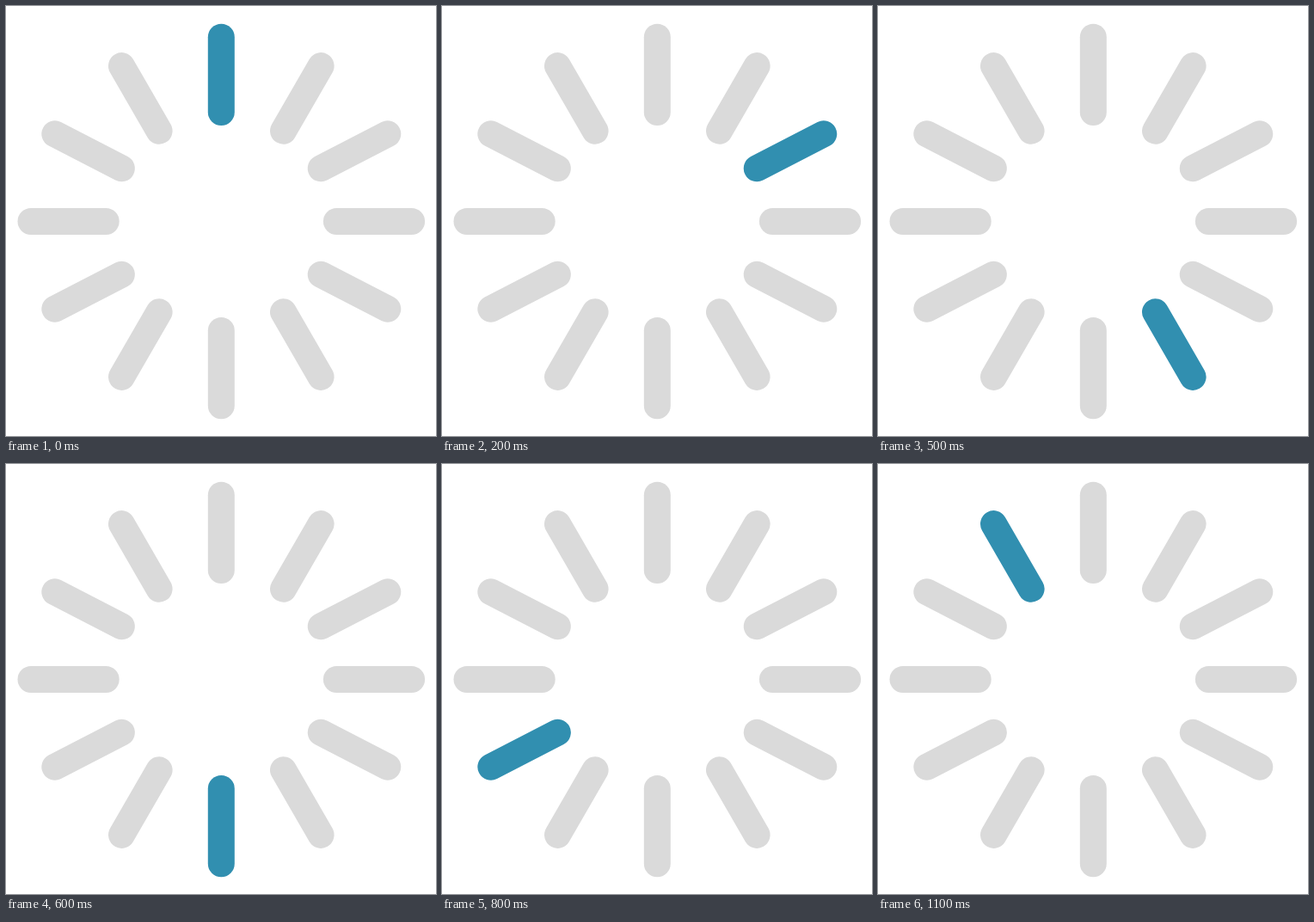
Recreate the animation shown at these times as an HTML page. Size 500x500 px, loop 1.2 s.

```html
<!DOCTYPE html>
<html lang="en">
<head>
<meta charset="utf-8">
<title>Spinner</title>
<style>
html, body { margin: 0; width: 100%; height: 100%; overflow: hidden; background: #fff; }
svg { display: block; width: 100%; height: 100%; }
line { stroke: #dadada; stroke-width: 31; stroke-linecap: round; }
line.on { stroke: #318fb0; }
</style>
</head>
<body>
<svg viewBox="0 0 500 500"></svg>
<script>
const STEP = 100, COUNT = 12, HALF = 43.6;
const CX = 250.3, CY = 250.5;
// One quarter, from the top to the right: middle x, middle y, tilt from vertical.
const quarter = [[0, 170.6, 0], [94, 143.1, 30], [154.7, 81.7, 62.7], [177.7, 0, 90]];

// The other quarters mirror the first.
function spoke(i) {
  const k = i % 6;
  const [x, y, tilt] = quarter[k > 3 ? 6 - k : k];
  const sx = i > 6 ? -1 : 1;
  const sy = i > 3 && i < 9 ? 1 : -1;
  const a = tilt * Math.PI / 180;
  const dx = HALF * Math.sin(a), dy = HALF * Math.cos(a);
  return `<line x1="${CX + sx * (x - dx)}" y1="${CY + sy * (y - dy)}"
    x2="${CX + sx * (x + dx)}" y2="${CY + sy * (y + dy)}"/>`;
}

const svg = document.querySelector("svg");
svg.innerHTML = Array.from({ length: COUNT }, (_, i) => spoke(i)).join("");
const lines = [...svg.children];
const start = performance.now();

function draw() {
  const elapsed = Math.max(0, performance.now() - start);
  const active = Math.floor(elapsed / STEP) % COUNT;
  lines.forEach((line, i) => line.classList.toggle("on", i === active));
  requestAnimationFrame(draw);
}
draw();
</script>
</body>
</html>
```
